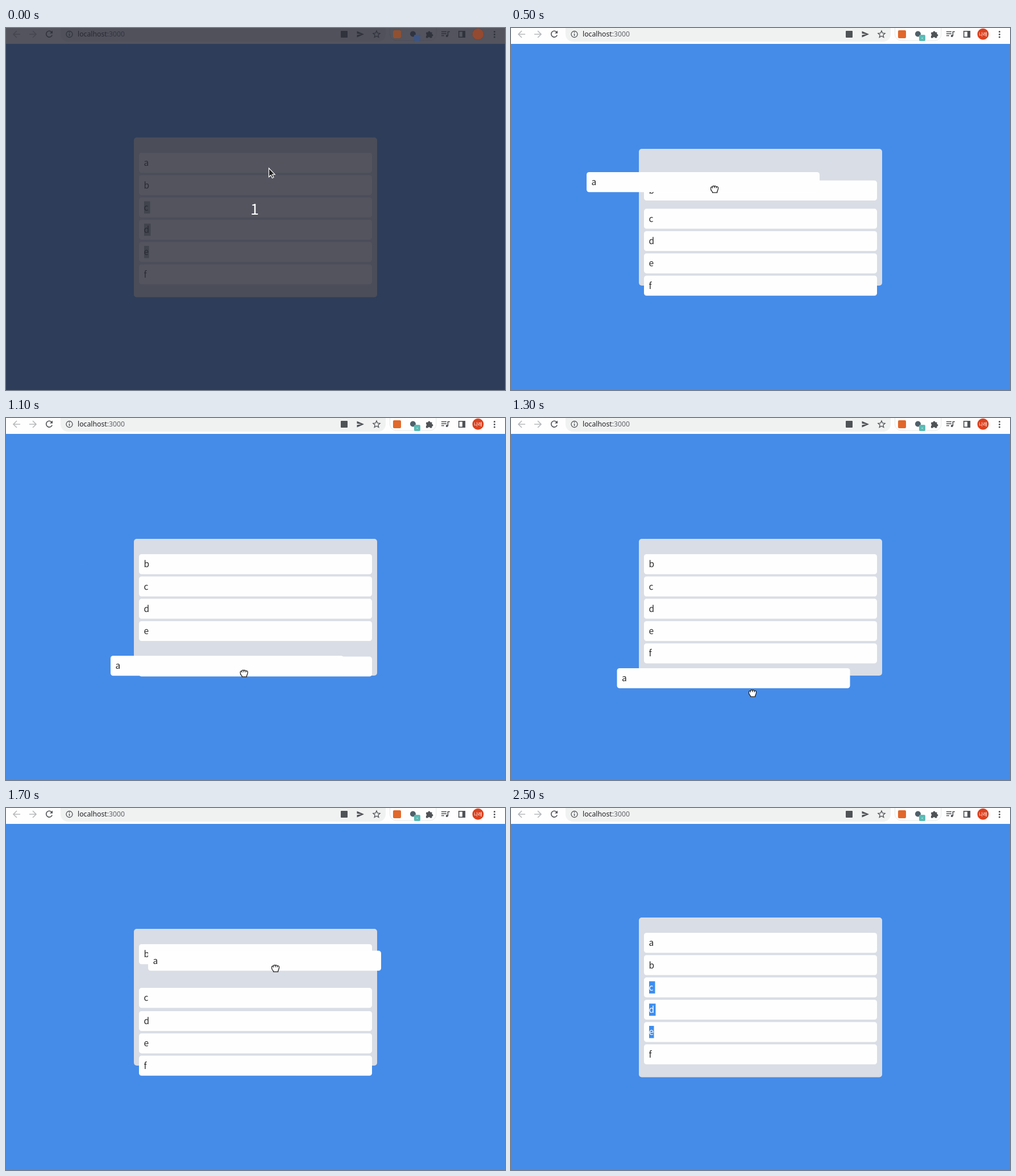
Write an HTML page that moves like this. It is 878 by 638 pixels and loops after 2700 ms.

```html
<!DOCTYPE html>
<html lang="en">
<head>
<meta charset="utf-8">
<title>Sortable list</title>
<style>
  html, body { margin: 0; width: 100%; height: 100%; overflow: hidden; background: #458ce9; }
  svg { display: block; width: 100%; height: 100%; }
  .row text { font: 15.5px "Noto Sans CJK KR", "Noto Sans CJK JP", "Noto Sans", sans-serif; }
  .url { font: 12.25px "Noto Sans", "Open Sans", sans-serif; }
  .avatar { font: 8px "Noto Sans CJK KR", "Noto Sans CJK JP", sans-serif; }
  .count { font: 27px "Noto Sans CJK KR", "Noto Sans CJK JP", "DejaVu Sans", sans-serif; }
  .line { fill: none; stroke: #505356; stroke-width: 1.6; }
</style>
</head>
<body>
<svg viewBox="0 0 878 638" preserveAspectRatio="none">
  <rect width="878" height="638" fill="#458ce9"/>
  <rect id="panel" x="225" width="428" rx="5" fill="#d9dde5"/>
  <g id="rows"></g>

  <g id="toolbar">
    <rect width="878" height="28" fill="#fefefe"/>
    <path d="M96 0H668V11a13 13 0 0 1-13 13H109a13 13 0 0 1-13-13Z" fill="#f0f1f1"/>
    <g class="line">
      <path d="M25 11H13m6-6-6 6 6 6M41 11H53m-6-6 6 6-6 6" stroke="#b7b9bb"/>
      <path d="M80.5 7.5A5.4 5.4 0 1 0 81.2 12.500"/>
      <circle cx="111.500" cy="11" r="5.500" stroke-width="1.300"/>
      <path d="M111.500 10v4M111.500 7v1.500" stroke-width="1.400"/>
      <path d="m652 5 1.700 4 4.400.4-3.300 2.900 1 4.200-3.800-2.300-3.800 2.300 1-4.200-3.300-2.900 4.400-.4Z" stroke-width="1.300"/>
      <path d="M766 6.500h9M766 10h9M766 13.500h5"/>
      <path d="M777.500 14V6.500h3.500"/>
      <rect x="796.800" y="5.800" width="10.600" height="10.400"/>
    </g>
    <g fill="#505356">
      <path d="M82 4.500v5h-5Z"/>
      <rect x="589" y="5" width="12" height="12" rx="1"/>
      <path d="M617.500 5.500 630 11l-12.500 5.500v-4.200l8-1.300-8-1.300Z"/>
      <path d="M739.500 7.500h3a2 2 0 1 1 4 0h3v3.300a2 2 0 1 1 0 4V17.500h-3.500a1.800 1.800 0 0 0-3.500 0h-3.500V14a1.800 1.800 0 0 0 0-3.400Z"/>
      <circle cx="775.800" cy="14" r="2"/>
      <path d="M803 5.500h5v11h-5Z"/>
      <circle cx="859.500" cy="6.500" r="1.500"/>
      <circle cx="859.500" cy="11.200" r="1.500"/>
      <circle cx="859.500" cy="15.900" r="1.500"/>
    </g>
    <path d="M675.500 0V11a11 11 0 0 0 11 11H746a11 11 0 0 0 11-11V0" fill="none" stroke="#e6e7e8"/>
    <rect x="681" y="4" width="14" height="14" rx="2" fill="#e2672a"/>
    <circle cx="716" cy="10.500" r="5" fill="#50606a"/>
    <rect x="718" y="12" width="11" height="11" rx="2" fill="#59bbb5"/>
    <path d="M722.500 18h2" stroke="#fff"/>
    <circle cx="830.500" cy="10.800" r="10" fill="#dc421f"/>
    <text class="avatar" x="830.500" y="13.800" text-anchor="middle" fill="#fff">나래</text>
    <text class="url" x="126" y="15.200" fill="#202124">localhost<tspan fill="#5f6368">:3000</tspan></text>
  </g>

  <g id="countdown">
    <rect width="878" height="638" fill="#282a36" fill-opacity=".8"/>
    <rect x="681" y="4" width="14" height="14" rx="2" fill="#925030"/>
    <rect x="718" y="12" width="11" height="11" rx="2" fill="#3c5585"/>
    <circle cx="830.500" cy="10.800" r="10" fill="#934a30"/>
    <text class="count" x="437.500" y="328.500" text-anchor="middle" fill="#fff">1</text>
    <path d="M462.500 247v15.500l3.500-3.300 2.500 5.300 2.500-1.200-2.400-5.100h4.600Z" fill="#222" stroke="#fff" stroke-width="1.200"/>
  </g>

  <path id="hand" d="M-6.500-1.500C-6.800-3.500-4.800-4.500-3.700-3.800C-3.500-5.900-.8-6.200-.2-4.800C.6-6 3-5.500 3.200-4C4.500-4.800 6.500-4.200 6.600-2.200C6.800 1 5.500 2.500 4.700 4.500V6.200H-3.500V4.800C-5.200 3-7 1.800-6.500-1.500ZM-3.700-3.800V-1.500M-.2-4.800V-2M3.200-4V-1.700"
    fill="#fff" stroke="#222" stroke-width="1.300" stroke-linejoin="round"/>
</svg>

<script>
const LOOP = 2700, STEP = 100, PITCH = 39.3;
const GRAB = 300, SELECT = 2100, DROP = 2500;
const SHIFT_TIME = 200;
const svg = document.querySelector('svg');
const byId = id => document.getElementById(id);

function add(parent, tag, attrs) {
  const node = document.createElementNS('http://www.w3.org/2000/svg', tag);
  set(node, attrs);
  return parent.appendChild(node);
}
function set(node, attrs) {
  for (const key in attrs) node.setAttribute(key, attrs[key]);
}
const show = (node, on) => set(node, { display: on ? 'inline' : 'none' });

// When each neighbour makes room: moving up, then back down.
const shifts = { b: [488, 1990], c: [690, 1604], d: [814, 1540], e: [848, 1490], f: [1080, 1420] };
const marks = { c: 10.5, d: 11.5, e: 8.5 };

// Time, x and y of the dragged row.
const dragPath = [
  [300, 234, 220], [400, 185, 235], [500, 133, 254], [700, 141, 318], [800, 158, 345],
  [900, 173, 372], [1100, 184, 419], [1300, 186.5, 441], [1400, 158, 433], [1500, 190, 368],
  [1600, 234, 300], [1700, 250, 251.5], [1800, 252, 252.5], [1900, 251, 253], [2000, 248, 251.5],
  [2100, 172, 112], [2200, 112, 1], [2300, 112, 1], [2400, 88, 0]
];
// Pointer position relative to the dragged row.
const gripPath = [
  [300, 225, 30], [500, 225, 30], [900, 231, 18], [1300, 238.5, 44],
  [1700, 224, 31], [2000, 225, 27], [2400, 225, 27]
];

function along(path, t) {
  const next = path.findIndex(point => point[0] >= t);
  if (next < 0) return path[path.length - 1].slice(1);
  if (next === 0) return path[0].slice(1);
  const [from, to] = [path[next - 1], path[next]];
  const k = (t - from[0]) / (to[0] - from[0]);
  return [1, 2].map(i => from[i] + (to[i] - from[i]) * k);
}

function progress(t, start) {
  const u = Math.min(1, Math.max(0, (t - start) / SHIFT_TIME));
  return 1 - (1 - u) ** 5;
}

const rows = [...'bcdefa'].map(letter => {
  const group = add(byId('rows'), 'g', { class: 'row' });
  add(group, 'rect', { width: 410, height: 35.2, rx: 4.5, fill: '#fefefe' });
  const mark = marks[letter] &&
    add(group, 'rect', { x: 9, y: 6.8, width: marks[letter], height: 21.5 });
  const label = add(group, 'text', { x: 8.6, y: 23.3 });
  label.textContent = letter;
  return { letter, group, mark, label, index: 'abcdef'.indexOf(letter) };
});

function rowPosition({ letter, index }, t, dragging) {
  if (!dragging) return [234, 220 + index * PITCH];
  if (letter === 'a') return along(dragPath, t);
  const [up, down] = shifts[letter];
  const offset = progress(t, down) - progress(t, up);
  return [234, 240 + (index + offset) * PITCH];
}

function draw(time) {
  const t = Math.floor((time % LOOP) / STEP) * STEP;
  const dimmed = t < STEP;
  const dragging = t >= GRAB && t < DROP;
  const selected = t < GRAB || t >= SELECT;

  set(byId('panel'), { y: dragging ? 213 : 193, height: dragging ? 241 : 281.5 });
  for (const row of rows) {
    const [x, y] = rowPosition(row, t, dragging);
    set(row.group, { transform: `translate(${x} ${y})` });
    if (row.mark) {
      show(row.mark, selected);
      set(row.mark, { fill: dimmed ? '#a8b0a8' : '#3d8ef0' });
    }
    set(row.label, { fill: row.mark && selected && !dimmed ? '#fff' : '#292929' });
  }
  show(byId('countdown'), dimmed);

  const hand = byId('hand');
  show(hand, !dimmed && t < DROP);
  const [x, y] = along(dragPath, t), [dx, dy] = along(gripPath, t);
  set(hand, { transform: `translate(${x + dx} ${y + dy})` });
}

const start = performance.now();
function tick() {
  draw(performance.now() - start);
  requestAnimationFrame(tick);
}
tick();
</script>
</body>
</html>
```
